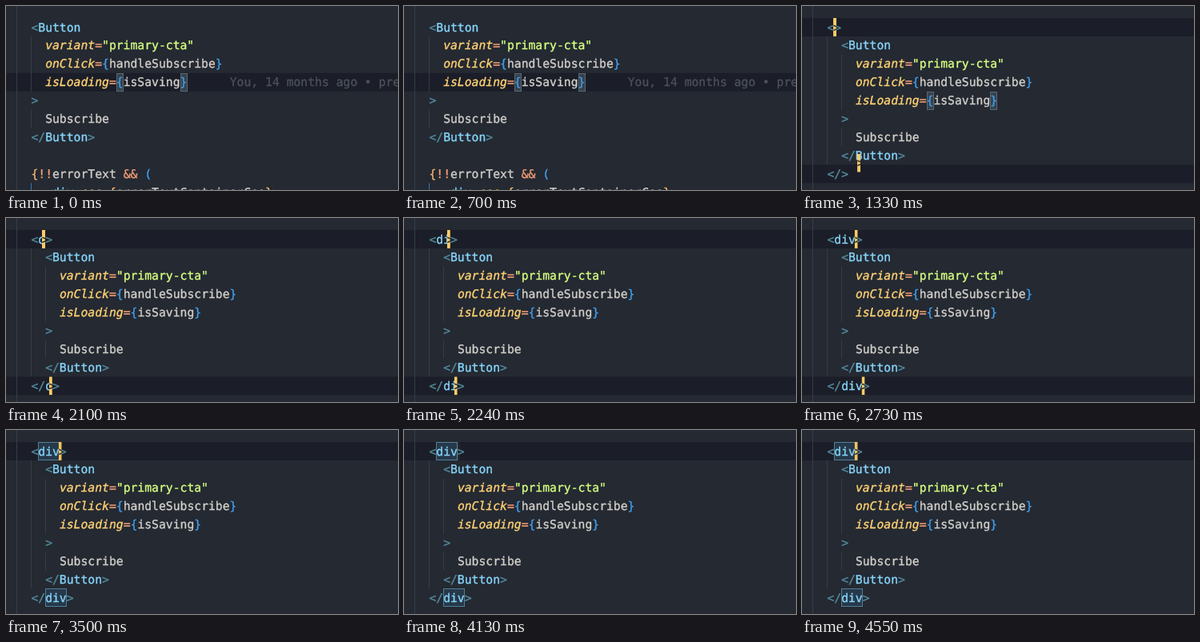
Animation, 490 px wide and 230 px high, one loop 4.62 s. Source, as an HTML page:

```html
<!DOCTYPE html>
<html lang="en">
<head>
<meta charset="utf-8">
<title>Wrapping JSX in a div</title>
<style>
html, body { margin: 0; width: 100%; height: 100%; overflow: hidden; background: #242932; }
svg { display: block; }
text { font: 14.73px "DejaVu Sans Mono", "Noto Sans Mono", monospace; white-space: pre; text-rendering: geometricPrecision; color: #d0cec8; }
text, tspan { fill: currentColor; stroke: currentColor; stroke-width: 0.35; }
.angle { color: #54899a; }
.tag { color: #86d5fa; }
.attr { color: #ffd173; font-style: italic; }
.op { color: #f29e74; }
.str { color: #d5ff80; }
.brace { color: #409fec; }
.outer { color: #f2b36b; }
.ghost { color: #4b505b; }
.hit { color: #ffcc66; font-weight: bold; }
.origin { color: #878b92; font-size: 12.5px; }
.under { color: #242932; }
.line { fill: #1b1e28; }
.guide { fill: #373c46; }
.scope { fill: #3578b0; }
.pair { fill: #37424e; stroke: #5b6874; }
.word { fill: #26394a; stroke: #527f97; }
.caret { fill: #ffcc66; }
.popup { fill: #1c202a; }
.picked { fill: #272c38; }
.icon { fill: none; stroke-width: 1.1; stroke-linejoin: round; }
</style>
</head>
<body>
<svg id="stage" width="490" height="230" viewBox="0 0 490 230"></svg>
<script>
const LOOP = 4620, LEFT = 31.4, TOP = 15, CHAR = 8.87, ROW = 22.92;
const WRAP = 1257, TYPED = [2045, 2185, 2290], POPUP = 2345, CLOSE = 2655, SINGLE = 2840, WORDS = 3075;
const SLIDE = 84, FADE = 210, BLINK = 1050;

const stage = document.getElementById("stage");
const colX = col => LEFT + col * CHAR;
const rowY = row => TOP + row * ROW;
const clamp = v => Math.max(0, Math.min(1, v));
const ease = v => v * v * (3 - 2 * v);
const esc = s => s.replace(/&/g, "&amp;").replace(/</g, "&lt;");

const rect = (cls, x, y, w, h) =>
  `<rect class="${cls}" x="${x}" y="${y}" width="${w}" height="${h}"/>`;
const span = ([cls, s]) => `<tspan class="${cls}">${esc(s)}</tspan>`;
const text = (x, y, parts) => `<text x="${x}" y="${y}">${parts.map(span).join("")}</text>`;
const code = (row, col, ...parts) => text(colX(col), rowY(row) + 16.5, parts);
const lineBar = row => rect("line", 0, rowY(row), 490, ROW);
const guide = (col, row, rows, cls = "guide") => rect(cls, Math.floor(colX(col)), rowY(row), 1, rows * ROW);
const frame = (cls, row, col, n) =>
  rect(cls, Math.round(colX(col)) + 0.5, Math.round(rowY(row)) + 0.5, Math.round(n * CHAR) - 1, 22);

// The wide caret repeats the character it covers in a dark tone.
const caret = (col, row, alpha, under = "") =>
  `<svg x="${colX(col) - 1.2}" y="${rowY(row)}" width="4" height="${ROW}" opacity="${alpha}">` +
  rect("caret", 0, 0, 4, ROW) + text(0, 16.5, [["under", under]]) + "</svg>";

// Caret stays solid after an edit, then blinks with soft fades.
function caretAlpha(t) {
  const last = [-1225, WRAP, ...TYPED, SINGLE].filter(e => e <= t).pop();
  const since = t - last - 630;
  if (since < 0) return 1;
  const p = since % BLINK;
  return p < 3 * FADE ? 1 - ease(clamp(p / FADE)) : ease(clamp((p - 3 * FADE) / FADE));
}

function button(row, col) {
  const prop = (r, name, value) =>
    code(row + r, col + 2, ["attr", name], ["op", "="], ["brace", "{"], ["", value], ["brace", "}"]);
  return guide(col, row + 1, 3) + guide(col, row + 5, 1) +
    code(row, col, ["angle", "<"], ["tag", "Button"]) +
    code(row + 1, col + 2, ["attr", "variant"], ["op", "="], ["str", '"primary-cta"']) +
    prop(2, "onClick", "handleSubscribe") +
    prop(3, "isLoading", "isSaving") +
    code(row + 4, col, ["angle", ">"]) +
    code(row + 5, col + 2, ["", "Subscribe"]) +
    code(row + 6, col, ["angle", "</"], ["tag", "Button"], ["angle", ">"]);
}

const pairs = (row, col) => frame("pair", row, col + 12, 1) + frame("pair", row, col + 21, 1);

function before(t) {
  return lineBar(3) + guide(-2, -1, 11) + guide(0, 9, 1, "scope") + pairs(3, 0) + button(0, 0) +
    code(3, 28, ["ghost", "You, 14 months ago • previous edit"]) +
    code(8, 0, ["outer", "{"], ["op", "!!"], ["", "errorText "], ["op", "&&"], ["brace", " ("]) +
    code(9, 2, ["angle", "<"], ["tag", "div "], ["attr", "css"], ["op", "="],
      ["outer", "{"], ["", "errorTextContainerCss"], ["outer", "}"], ["angle", ">"]) +
    caret(22, 3, caretAlpha(t));
}

function popup() {
  const names = ["", "1", "1Outlined", "1Rounded", "1Sharp", "1TwoTone", "2", "2Outlined", "2Rounded"];
  const cube = "M-6 -2L1 -5.5 6 -3V2L-1 6 -6 3ZM-6 -2L-1 .5 6 -3M-1 .5V6";
  const symbol = "M-4 -5H-7V5H-4M4 -5H7V5H4M-3.5 -1L.5 -3 3.5 -1.5V1L-.5 3 -3.5 1.5ZM-3.5 -1L-.5 .5 3.5 -1.5M-.5 .5V3";
  return rect("popup", 66, 38, 424, 192) + rect("picked", 66, 38, 424, 23) +
    names.map((name, i) => {
      const y = 49.5 + i * 23;
      return `<path class="icon" transform="translate(77 ${y + 0.5})" d="${i ? symbol : cube}" stroke="${i ? "#68bff0" : "#c4c4c0"}"/>` +
        text(89.4, y + 5.2, i ? [["hit", "Div"], ["", "ersity" + name]] : [["hit", "div"]]) +
        (i ? text(343, y + 4.7, [["origin", "@mui/icons-material"]]) : "");
    }).join("");
}

function after(t) {
  const n = TYPED.filter(e => e <= t).length;
  const name = "div".slice(0, n);
  const moved = n ? n - 1 + clamp((t - TYPED[n - 1]) / SLIDE) : 0;
  const jump = 1 - clamp((t - WRAP) / SLIDE);
  const alpha = caretAlpha(t);
  const twin = t < SINGLE;
  return lineBar(0) + (twin ? lineBar(8) : "") +
    guide(-2, -1, 11) + guide(0, 1, 7) +
    (jump ? pairs(4, 2) : "") +
    (t >= WORDS ? frame("word", 0, 1, 3) + frame("word", 8, 2, 3) : "") +
    code(0, 0, ["angle", "<"], ["tag", name], ["angle", ">"]) +
    button(1, 2) +
    code(8, 0, ["angle", "</"], ["tag", name], ["angle", ">"]) +
    caret(1 + moved, 0, alpha, ">") +
    (twin ? caret(2 + moved + 20 * jump, 8 - 5 * jump, alpha, ">") : "") +
    (t >= POPUP && t < CLOSE ? popup() : "");
}

let shown = "";
function draw(now) {
  const t = now % LOOP;
  const next = t < WRAP ? before(t) : after(t);
  if (next !== shown) stage.innerHTML = shown = next;
  requestAnimationFrame(draw);
}
requestAnimationFrame(draw);
</script>
</body>
</html>
```
